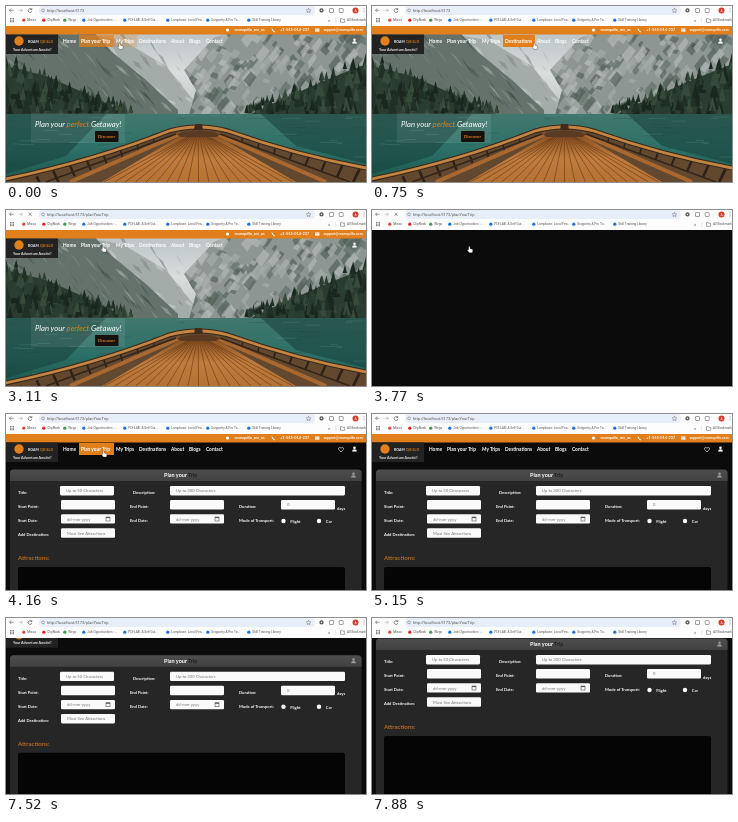
Recreate the animation shown at these times as an HTML page. Size 360x176 px, loop 8000 ms.

```html
<!DOCTYPE html>
<html lang="en">
<head>
<meta charset="utf-8">
<title>Trip planner</title>
<style>
html, body { margin: 0; width: 100%; height: 100%; overflow: hidden; background: #0b0b0b; }
svg { display: block; width: 100vw; height: 100vh; }
text { font-family: Lato, 'Open Sans', sans-serif; white-space: pre; }
.ui { font-family: Roboto, Arial, sans-serif; }
</style>
</head>
<body>
<svg id="stage" viewBox="0 0 360 176"></svg>
<script>
const LOOP = 8000;
const CLICK = 2740, BLANK = 3770, PAGE = 3910, LOADED = 4160;
const ORANGE = '#e07f1c';

// Menu labels with their left edges; each box ends where the next begins.
const nav = Object.entries({ 'Home': 57, 'Plan your Trip': 75, 'My Trips': 110, 'Destinations': 133,
  'About': 165, 'Blogs': 183, 'Contact': 200, '': 222 });

// Pointer key points: time, x, y
const path = [[-100, 104, 36], [0, 113, 37], [480, 140, 38], [1310, 206, 35], [1460, 196, 35], [1580, 134, 37],
  [1940, 113, 35], [2210, 96, 35], [4410, 97, 37], [4650, 197, 72], [5150, 278, 109]];

const rect = (x, y, w, h, fill, extra = '') => `<rect x="${x}" y="${y}" width="${w}" height="${h}" fill="${fill}" ${extra}/>`;
const dot = (x, y, r, fill, extra = '') => `<circle cx="${x}" cy="${y}" r="${r}" fill="${fill}" ${extra}/>`;
const text = (s, x, y, size, fill, extra = '') => `<text x="${x}" y="${y}" font-size="${size}" fill="${fill}" ${extra}>${s}</text>`;
const line = (d, stroke, w = 0.6, extra = '') => `<path d="${d}" fill="none" stroke="${stroke}" stroke-width="${w}" ${extra}/>`;
const shape = (d, fill, extra = '') => `<path d="${d}" fill="${fill}" ${extra}/>`;
const repeat = (n, make) => Array.from({ length: n }, (_, i) => make(i)).join('');
const bold = 'font-weight="700"';
const ui = 'class="ui"';

function grad(id, stops) {
  const list = stops.map((c, i) => `<stop offset="${i / (stops.length - 1)}" stop-color="${c}"/>`).join('');
  return `<linearGradient id="${id}" x1="0" y1="0" x2="0" y2="1">${list}</linearGradient>`;
}

function random(seed) {
  return () => (seed = (seed * 16807) % 2147483647) / 2147483647;
}

function person(x, y, fill) {
  return dot(x, y - 1.2, 1.3, fill) + shape(`M${x - 2.4} ${y + 2.6}q0-2.4 2.4-2.4t2.4 2.4z`, fill);
}

function browser() {
  const blue = '#1d6fe0';
  const marks = [['Missa', 17, '#d94a3d'], ['ClipNook', 37, '#e02020'], ['Wegs', 58, '#3f9a58'],
    ['Job Opportunities -...', 77, blue], ['PIX-LAB: A Self Gui...', 118, blue], ['Lampbase: Local Fea...', 161, blue],
    ['Snippetry A Pro To...', 201, blue], ['Skill Training Library', 242, blue]];
  let out = rect(0, 0, 360, 20, '#fdfdfe') + rect(33, 0, 276, 9, '#e8eef7', 'rx="4"');
  out += line('M7.5 4.3H3.5m1.8-1.8L3.5 4.3l1.8 1.8', '#555') + line('M12.5 4.3h4m-1.8-1.8l1.8 1.8l-1.8 1.8', '#aaa');
  out += line('M25.6 3.4a1.9 1.9 0 1 0 .3 1.6M25.8 2v1.6h-1.6', '#444', 0.6, 'id="reload"');
  out += line('M22.6 2.8l3 3m0-3l-3 3', '#444', 0.6, 'id="stop"');
  out += dot(37, 4.4, 1.4, 'none', 'stroke="#666" stroke-width=".5"') + text('', 41, 5.9, 4, '#555', `id="url" ${ui}`);
  out += line('M302.5 2.2l.7 1.5l1.6.2l-1.2 1.1l.3 1.6l-1.4-.8l-1.4.8l.3-1.6l-1.2-1.1l1.6-.2z', '#555', 0.4);
  out += dot(315.5, 4.4, 2.1, '#555') + dot(315.5, 4.4, 0.8, '#ddd');
  out += repeat(2, i => rect(323.5 + i * 9.7, 2.5, 4, 4, 'none', 'rx=".5" stroke="#666" stroke-width=".6"'));
  out += dot(349.5, 4.5, 3, '#d33b2c') + text('A', 348.5, 5.8, 3.3, '#fff', ui);
  out += repeat(3, i => dot(358, 2.8 + i * 1.6, 0.45, '#555'));
  out += repeat(9, i => rect(4 + (i % 3) * 1.5, 12.2 + Math.floor(i / 3) * 1.5, 1, 1, '#666'));
  for (const [name, x, color] of marks) out += dot(x + 0.8, 14.2, 1.6, color) + text(name, x + 4.3, 15.4, 3.2, '#555', ui);
  out += text('»', 322, 15.6, 4.5, '#555', ui) + rect(329.5, 12, 0.4, 5, '#ccc');
  return out + line('M334.5 12.6h1.6l.6.7h2v3h-4.2z', '#555', 0.5) + text('All Bookmarks', 341, 15.4, 3.2, '#555', ui);
}

// Broken rock: slanted slivers of light and shade
function crags(count, x0, x1, lean, colors, seed) {
  const rnd = random(seed);
  return repeat(count, () => {
    const x = x0 + rnd() * (x1 - x0), y = 20 + rnd() * 80, h = 5 + rnd() * 15, w = 2 + rnd() * 5;
    const color = colors[Math.floor(rnd() * colors.length)];
    return shape(`M${x} ${y}l${w} ${h * 0.3}l${lean * h * 0.6} ${h * 0.7}l${-w} ${-h * 0.4}z`, color, 'opacity=".6"');
  });
}

// Firs on a slope that falls from the stage edge towards the lake
function forest(count, edge, reach, seed) {
  const rnd = random(seed);
  const colors = ['#1f3027', '#2a3e31', '#374b3b', '#19271f'];
  return repeat(count, i => {
    const d = rnd(), top = 45 + d * 52, y = top + rnd() * (100 - top);
    const x = edge + reach * d, h = 8 + rnd() * 12 * (1 - d);
    return shape(`M${x} ${y}l${h / 4} ${h}h${-h / 2}z`, colors[i % 4]);
  });
}

function scene() {
  let out = rect(0, 20, 360, 95, 'url(#sky)');
  out += shape('M78 28L116 34L160 60L192 100V113H90z', '#a4acaa');
  out += crags(50, 95, 200, 0.6, ['#c9cfce', '#7d8985', '#b5bcba'], 7);
  const left = 'M0 20H82L106 46L140 74L172 104V113H0z', right = 'M182 113L190 84L178 64L208 32L240 20H360V113z';
  out += `<clipPath id="left"><path d="${left}"/></clipPath><clipPath id="right"><path d="${right}"/></clipPath>`;
  out += shape(left, '#65716b') + shape(right, '#8d9693');
  out += `<g clip-path="url(#left)">${crags(110, 0, 160, 0.8, ['#87918d', '#46564c', '#a2aaa7', '#3d4c43'], 17)}</g>`;
  out += `<g clip-path="url(#right)">${crags(170, 180, 360, -0.8, ['#b9bfbd', '#5c6963', '#a9b0ae', '#4b5a51'], 91)}</g>`;
  out += shape('M0 60L40 70L90 92L130 113H0z', '#2a3b30') + shape('M360 58L320 74L270 96L235 113H360z', '#2a3b30');
  out += forest(150, 0, 125, 5) + forest(150, 360, -120, 23);
  out += rect(0, 108, 360, 68, 'url(#lake)');
  out += shape('M0 108H100L60 150L0 168zM360 108H255L290 140L360 158z', '#173f37', 'opacity=".55"');
  const rnd = random(44);
  out += repeat(80, i => rect(rnd() * 350, 109 + rnd() * 62, 5 + rnd() * 18, 0.6, i % 2 ? '#5f9c91' : '#17473f', 'opacity=".4"'));
  return out + boat();
}

function boat() {
  const rim = 'M0 173Q90 154 163 125Q192 117 222 125Q290 149 360 162';
  let out = shape(rim + 'V176H0z', '#62482f');
  // ribs and boards on both inner sides
  for (const [end, drop] of [[-1, 50], [1, 42]]) {
    out += repeat(9, i => {
      const p = (i + 1) / 9, x = 192 + end * (28 + 150 * p), y = 126 + drop * p;
      return line(`M${x} ${y}l${-end * 7 * p} ${5 + 9 * p}`, '#2d2118', 1 + 2 * p);
    });
    out += line(`M${192 + end * 18} 128L${192 + end * 128} 176`, '#a8682f', 4);
    out += line(`M${192 + end * 22} 128L${192 + end * 152} 176`, '#33251a', 1.6);
  }
  out += shape('M176 129H210L290 176H96z', 'url(#wood)');
  out += line(repeat(19, i => `M${185 + i * 0.8} 129L${98 + i * 10.5} 176`), '#5c3517', 0.8, 'opacity=".7"');
  out += line(rim, '#39261a', 5) + line(rim, '#c48543', 2.8);
  return out + shape('M170 128Q192 121 215 128L210 131H175z', '#593a22') + shape('M188 124l1-6h7l1 6z', '#422b1b');
}

function topBar() {
  let out = rect(0, 20, 360, 8.5, ORANGE);
  out += dot(221.5, 24, 1.6, '#fff') + text('roamquillo_see_us', 228.5, 25.4, 3.7, '#fff', bold);
  out += line('M266 22.6q.4 2.8 3 3.4', '#fff', 1) + text('+1-555-014-237', 274, 25.4, 3.9, '#fff', bold);
  out += rect(309, 22.4, 4.4, 3.2, '#fff') + line('M309 22.5l2.2 1.7l2.2-1.7', ORANGE, 0.5);
  return out + text('support@roamquillo.com', 317.5, 25.4, 3.5, '#fff', bold);
}

function header() {
  let out = topBar() + rect(0, 28.5, 52, 19.5, '#222') + dot(13, 35, 4.7, ORANGE);
  out += text(`ROAM <tspan fill="${ORANGE}">QUILLO</tspan>`, 22, 37.2, 3.4, '#fff', bold + ' letter-spacing=".15"');
  out += text('Your Adventure Awaits!!', 7, 44.6, 3.6, '#eee', bold);
  nav.slice(0, -1).forEach(([name, x], i) => {
    out += rect(x - 2, 29, nav[i + 1][1] - x, 12, ORANGE, 'class="hover"') + text(name, x, 36.7, 4.8, '#fff', bold);
  });
  return out + person(348.5, 35, '#fff');
}

function home() {
  let out = scene() + header() + rect(25, 107, 94, 30, '#fff', 'opacity=".08"');
  out += text(`Plan your <tspan fill="${ORANGE}">perfect</tspan> Getaway!`, 29, 120.5, 7.7, '#fff', 'font-style="italic"');
  return out + rect(89, 125, 23.5, 11, '#16110d', 'rx="1"') + text('Discover', 92, 132.2, 4.4, ORANGE, bold);
}

function form() {
  const rowY = row => 72 + 14.1 * row;
  const label = (s, x, row) => text(s, x, rowY(row) + 8, 4.1, '#fff', bold);
  const radio = (s, x) => dot(x, 107, 2.2, '#fff') + label(s, x + 6.7, 2.05);
  function field(name, x, row, inputX, hint = '', w = 54) {
    const y = rowY(row);
    let out = label(name, x, row) + rect(inputX, y, w, 9.4, '#fafafa', 'rx="1.3"') + text(hint, inputX + 6, y + 6.3, 4.2, '#777');
    if (hint.startsWith('dd')) {
      out += rect(inputX + 45, y + 2.8, 4, 4, 'none', 'stroke="#555" stroke-width=".6"') + rect(inputX + 45, y + 2.8, 4, 1.1, '#555');
    }
    return out;
  }
  let out = rect(4, 56, 351.5, 190, '#262626', 'rx="3"');
  out += shape('M4 67V59q0-3.5 3.5-3.5H352q3.5 0 3.5 3.5V67z', 'url(#bar)');
  out += text('Plan your <tspan fill="#222">Trip</tspan>', 158, 63, 5.5, '#fff', bold) + person(347.5, 61, '#999');
  out += field('Title:', 12, 0, 54, 'Up to 50 Characters') + field('Description:', 127, 0, 164, 'Up to 300 Characters', 175);
  out += field('Start Point:', 12, 1, 55) + field('End Point:', 124, 1, 164);
  out += field('Duration:', 233, 1, 275, '0') + label('days', 331, 1.1);
  out += field('Start Date:', 12, 2, 55, 'dd-mm-yyyy') + field('End Date:', 124, 2, 164, 'dd-mm-yyyy');
  out += label('Mode of Transport:', 233, 2) + radio('Flight', 277.5) + radio('Car', 313);
  out += field('Add Destination:', 12, 3, 55, 'Must See Attractions');
  return out + text('Attractions:', 12, 146.3, 6.2, ORANGE) + rect(12, 153, 327, 90, '#050505', 'rx="2"');
}

const heart = line('M335 38l-2.3-2.4q-.8-2 1-2.2q.9 0 1.3.9q.4-.9 1.3-.9q1.8.2 1 2.2z', '#fff');
const stage = document.getElementById('stage');
stage.innerHTML = `<defs>
  ${grad('sky', ['#b7c0c3', '#d9dddd', '#bac2c0'])}
  ${grad('lake', ['#42776c', '#2d7168', '#1b574e'])}
  ${grad('wood', ['#8b5122', '#c07c3d', '#b47234'])}
  ${grad('bar', ['#4d4d4d', '#424242'])}
  <clipPath id="view"><rect y="20" width="360" height="156"/></clipPath>
</defs>
${rect(0, 0, 360, 176, '#0b0b0b')}
<g clip-path="url(#view)"><g id="home">${home()}</g><g id="plan">${header()}${heart}${form()}</g></g>
${browser()}
<g id="cursor" fill="#fff" stroke="#222" stroke-width=".35">
  <path id="hand" d="M0 0q.8-.6 1.2.3l.4 2l1.9.6q.8.3.6 1.2l-.5 2.2h-3.1l-2-2.6q.2-.8 1.3-.2z"/>
  <path id="arrow" d="M0 0v5.4l1.3-1.2l.9 2l.9-.4l-.9-1.9h1.7z"/>
</g>`;

const el = id => document.getElementById(id);
const show = (node, on) => node.setAttribute('display', on ? 'inline' : 'none');
const move = (node, x, y) => node.setAttribute('transform', `translate(${x} ${y})`);
const hoverBoxes = [...stage.querySelectorAll('.hover')];

function pointer(t) {
  const i = path.findIndex(key => key[0] > t);
  if (i < 0) return path[path.length - 1].slice(1);
  if (i === 0) return path[0].slice(1);
  const [t0, x0, y0] = path[i - 1], [t1, x1, y1] = path[i];
  const p = (t - t0) / (t1 - t0);
  return [x0 + (x1 - x0) * p, y0 + (y1 - y0) * p];
}

// Share of the last 300 ms that the pointer spent on a menu box
function hover(i, t) {
  const steps = 12;
  let hits = 0;
  for (let k = 0; k < steps; k++) {
    const [x, y] = pointer(t - k * 300 / steps);
    if (y < 41 && x >= nav[i][1] - 2 && x < nav[i + 1][1] - 2) hits++;
  }
  return hits / steps;
}

// One notch of the mouse wheel, easing out
function notch(t, start) {
  const p = Math.min(1, Math.max(0, (t - start) / 380));
  return 17.5 * Math.sin(p * Math.PI / 2);
}

function draw(t) {
  const loading = t >= CLICK && t < LOADED;
  const frozen = t >= 1940 && t < PAGE;
  show(el('home'), t < BLANK);
  show(el('plan'), t >= PAGE);
  move(el('plan'), 0, -notch(t, 6970) - notch(t, 7510));
  show(el('reload'), !loading);
  show(el('stop'), loading);
  el('url').textContent = 'http://localhost:5173' + (t >= CLICK + 250 ? '/planYourTrip' : '');
  hoverBoxes.forEach((box, i) => box.setAttribute('opacity', frozen ? 0 : hover(i % (nav.length - 1), t)));
  move(el('cursor'), ...pointer(t));
  show(el('cursor'), t < 5150);
  show(el('hand'), t < 4410);
  show(el('arrow'), t >= 4410);
}

const start = performance.now();
function frame() {
  draw((performance.now() - start) % LOOP);
  requestAnimationFrame(frame);
}
frame();
</script>
</body>
</html>
```
